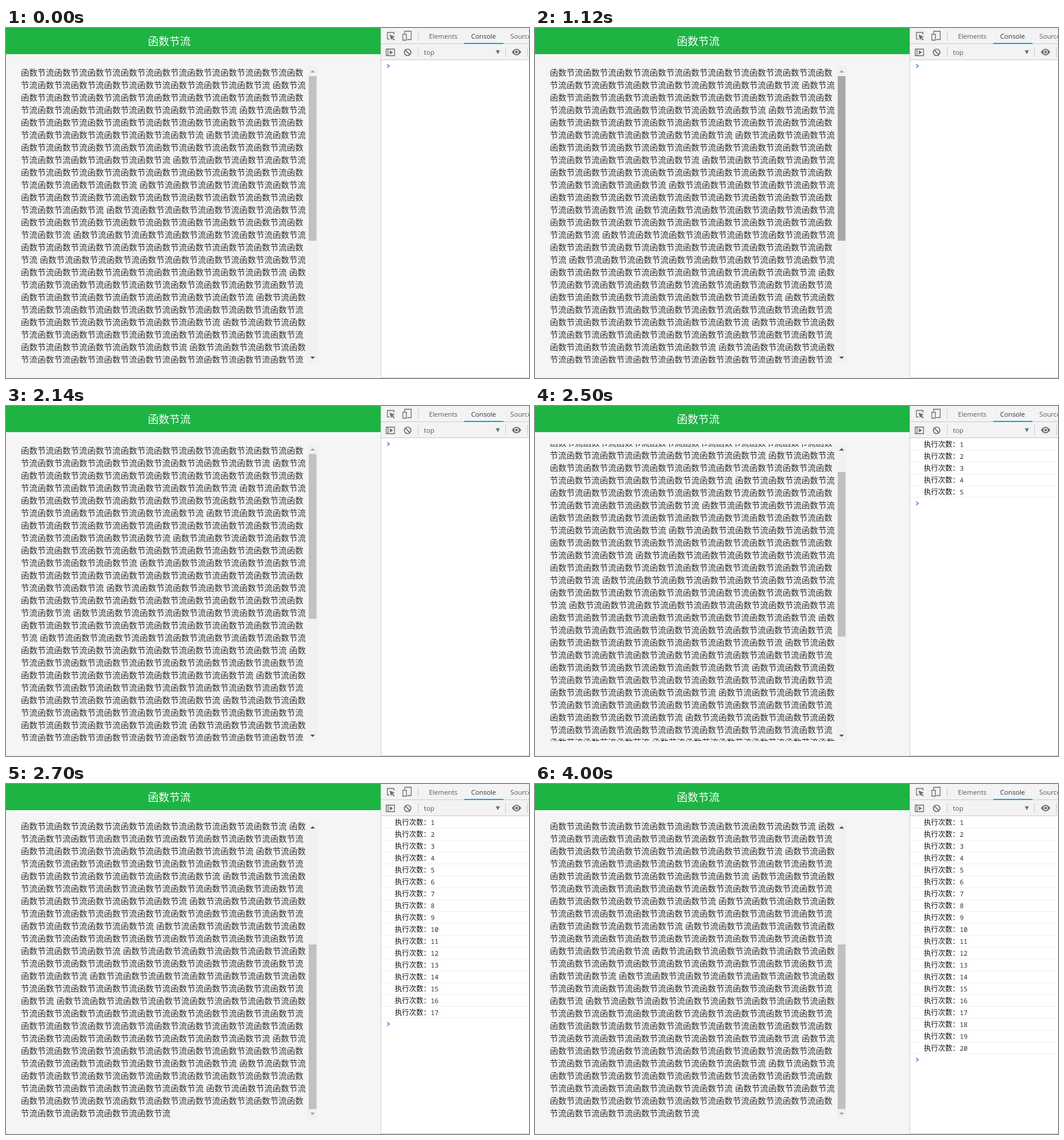
Recreate the animation shown at these times as an HTML page. Size 881 px wide and 589 px high, loop 4.8 s.

```html
<!DOCTYPE html>
<html lang="zh-CN">
<head>
<meta charset="utf-8">
<title>函数节流</title>
<style>
  html, body { margin: 0; width: 100%; height: 100%; overflow: hidden; background: #f5f5f5; }
  svg { position: absolute; left: 0; top: 0; }
  #view { position: absolute; left: 25px; top: 64px; width: 483px; height: 500px; overflow: hidden; }
  #copy { font: 14px/21px "Open Sans", "Noto Sans CJK SC", "Noto Sans CJK", sans-serif; word-spacing: .36px; color: #333; }
  .title { font: 18px "Noto Sans CJK SC", "Noto Sans CJK", sans-serif; fill: #fff; text-anchor: middle; }
  .ui { font: 11.2px "Open Sans", "Noto Sans", sans-serif; fill: #5a5a5a; }
  .log { font: 12px "Noto Sans CJK SC", "Noto Sans CJK", sans-serif; fill: #111; }
  .num { font: 11px "Noto Sans Mono", monospace; fill: #303030; }
  .line { fill: none; stroke: #6e6e6e; stroke-width: 1.3; }
  .solid { fill: #6e6e6e; }
</style>
</head>
<body>
<svg width="881" height="589" viewBox="0 0 881 589">
  <rect width="631" height="44" fill="#1db443"/>
  <text class="title" x="275" y="29">函数节流</text>

  <rect x="508" y="64" width="17" height="500" fill="#f1f1f1"/>
  <rect id="thumb" x="510" width="13" height="277"/>
  <path id="up" d="M512.5 75h8l-4-4z"/>
  <path id="down" d="M512.5 553h8l-4 4z"/>

  <rect x="631" width="250" height="589" fill="#fff"/>
  <rect x="632" width="249" height="53" fill="#f3f3f3"/>
  <path d="M631.5 0V589M632 26.5H881M632 53.5H881M632 588.5H881M694.5 5V22M694.5 32V49M841.5 32V49M878.5 32V49" stroke="#ccc"/>
  <rect x="772" y="25" width="66" height="2" fill="#03a9f4"/>

  <g class="line">
    <path d="M646 18.5H642.5V7.5H653.5V11"/>
    <path d="M671.5 9V5.5H682.5V19.5H676M668.5 10.5H674.5V20.5H668.5z"/>
    <path d="M640.5 35.5H654.5V46.5H640.5zM643.5 35.5V46.5"/>
    <circle cx="676.5" cy="41" r="5.5" stroke-width="1.7"/>
    <path d="M672.6 37.1l7.8 7.8" stroke-width="1.7"/>
  </g>
  <g class="solid">
    <path d="M646 11l9 3.6-3.6 1.5 3.4 3.4-1.4 1.4-3.4-3.4-1.2 3z"/>
    <path d="M646.5 37.5v7l5.5-3.5z"/>
    <path d="M825 37.5h7l-3.5 6.5z"/>
    <path d="M852 40.5Q860 29.5 868 40.5Q860 51.5 852 40.5z"/>
  </g>
  <circle cx="860" cy="40.5" r="3" fill="#6e6e6e" stroke="#f3f3f3" stroke-width="1.4"/>

  <text class="ui" x="712.5" y="18">Elements</text>
  <text class="ui" x="783.5" y="18" style="fill:#333">Console</text>
  <text class="ui" x="849.5" y="18">Sources</text>
  <text class="ui" x="704" y="45">top</text>

  <g id="rows"></g>
  <path id="prompt" d="M642 61l3.7 3-3.7 3" fill="none" stroke="#367cf1" stroke-width="1.5"/>
</svg>
<div id="view"><div id="copy"></div></div>

<script>
const LOOP = 4800, MAX_SCROLL = 340, THUMB_TRAVEL = 189.4;
const $ = id => document.getElementById(id);

// start time, scroll offset, number of log rows, thumb colour
const steps = [
  [0, 0, 0, '#c1c1c1'],
  [400, 0, 0, '#a8a8a8'],
  [1600, 0, 0, '#c1c1c1'],
  [2500, 55, 5, '#c1c1c1'],
  [2600, 260, 9, '#c1c1c1'],
  [2700, 340, 17, '#c1c1c1'],
  [2800, 340, 20, '#c1c1c1'],
];

$('copy').textContent = Array(21).fill('函数节流'.repeat(16)).join(' ');

function logRows(count) {
  let html = '';
  for (let i = 1; i <= count; i++) {
    const y = 49 + 20 * i, border = y + (i < count ? 5.5 : 4.5);
    html += `<text class="log" x="655" y="${y}">执行次数：</text>
      <text class="num" x="715.5" y="${y}">${i}</text>
      <path d="M632 ${border}H881" stroke="#f0f0f0"/>`;
  }
  return html;
}

function render([, scroll, count, colour]) {
  const arrow = enabled => enabled ? '#505050' : '#a3a3a3';
  $('copy').style.transform = `translateY(${-scroll}px)`;
  $('thumb').setAttribute('y', 81 + Math.floor(scroll / MAX_SCROLL * THUMB_TRAVEL));
  $('thumb').setAttribute('fill', colour);
  $('up').setAttribute('fill', arrow(scroll > 0));
  $('down').setAttribute('fill', arrow(scroll < MAX_SCROLL));
  $('rows').innerHTML = logRows(count);
  $('prompt').setAttribute('transform', `translate(0 ${20 * count})`);
}

let shown;
function tick() {
  const time = performance.now() % LOOP;
  const step = steps.findLast(([start]) => start <= time);
  if (step !== shown) render(shown = step);
  requestAnimationFrame(tick);
}
tick();
</script>
</body>
</html>
```
